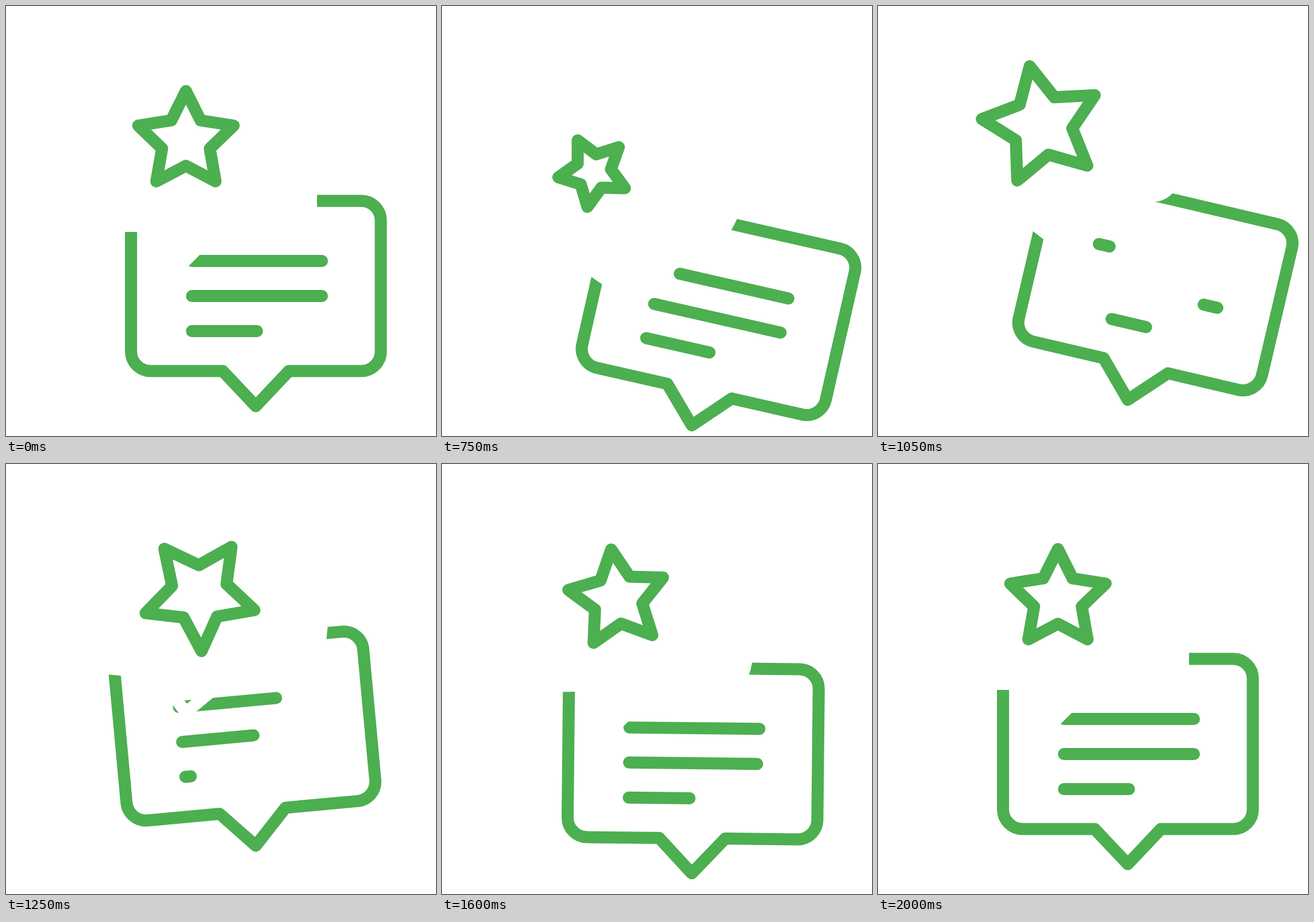
Animation of 748 by 748 pixels, one loop 2.02 s. Source, as an HTML page without scripts:

```html
<!DOCTYPE html>
<html lang="en">
<head>
<meta charset="utf-8">
<title>Review bubble</title>
<style>
html, body { margin: 0; width: 100%; height: 100%; overflow: hidden; background: #fff; }
svg { display: block; width: 100vw; height: 100vh; fill: none; stroke: #4caf50; stroke-width: 21; stroke-linejoin: round; stroke-linecap: round; }

.bubble, .gap, .notch, .sway, .star, .rows line {
  animation-duration: 2.02s;
  animation-iteration-count: infinite;
  animation-timing-function: cubic-bezier(.37, 0, .63, 1);
}

/* speech bubble: bounce and tilt around its tip */
.bubble { transform-origin: 434px 696px; animation-name: bounce, tilt; }
@keyframes bounce {
  0%, 24.75% { translate: 0 0; }
  37.62% { translate: 0 33.5px; animation-timing-function: cubic-bezier(.42, 0, .55, 1); }
  61.88% { translate: 0 -32px; }
  79.21% { translate: 0 16px; }
  99.01%, 100% { translate: 0 0; }
}
@keyframes tilt {
  0% { rotate: 0deg; }
  24.75% { rotate: 0deg; animation-timing-function: cubic-bezier(.2, 0, .2, 1); }
  47.52% { rotate: 15deg; animation-timing-function: cubic-bezier(.57, 0, .5, 1); }
  65.84% { rotate: -7deg; }
  86.14% { rotate: 3.2deg; }
  99.01%, 100% { rotate: 0deg; }
}

/* opening in the outline, next to the star */
.gap { fill: #fff; stroke: none; animation-name: gap; }
@keyframes gap {
  0%, 24.75%, 99.01%, 100% { d: path("M200 393L235 393L260 365L541 356Q541 338 541 320L200 320Z"); }
  37.13% { d: path("M200 480L235 494L260 365L423.5 356Q430 342 433 320L200 320Z"); }
  51.98% { d: path("M200 445L235 461L260 365L396 351Q422 346 432 320L200 320Z"); }
  61.88% { d: path("M200 375L235 381L260 365L589 356Q592 338 595.5 320L200 320Z"); }
  79.21% { d: path("M200 383L235 382L260 365L527 356Q535 344 536 320L200 320Z"); }
}

/* text rows: wiped from the left, then written again */
.rows line { animation-name: rewrite; animation-timing-function: linear; stroke-dasharray: 1 2; }
.rows line:nth-child(2) { animation-delay: .1s; }
.rows line:nth-child(3) { animation-delay: .2s; }
@keyframes rewrite {
  0%, 32.18% { stroke-dasharray: 1 2; stroke-dashoffset: 0; }
  37.13% { stroke-dashoffset: -.14; }
  42.08% { stroke-dashoffset: -.45; }
  47.03% { stroke-dashoffset: -.89; }
  49.5% { stroke-dasharray: 1 2; stroke-dashoffset: -1; }
  49.51% { stroke-dasharray: 0 2; stroke-dashoffset: 0; }
  51.98% { stroke-dasharray: .08 2; }
  56.93% { stroke-dasharray: .55 2; }
  61.88% { stroke-dasharray: .75 2; }
  69.31% { stroke-dasharray: .935 2; }
  74.26% { stroke-dasharray: .985 2; }
  79.21%, 100% { stroke-dasharray: 1 2; stroke-dashoffset: 0; }
}

/* white corner that clips the first row */
.notch { stroke: #fff; stroke-linejoin: miter; stroke-linecap: butt; animation-name: notch; }
@keyframes notch {
  0%, 24.75%, 99.01%, 100% { d: path("M270 416L300 455L345 410"); }
  37.13% { d: path("M300 351L330 390L375 345"); }
  51.98% { d: path("M300 331L330 370L375 330"); }
  61.88% { d: path("M283 393L313 432L371 384"); }
  79.21% { d: path("M265 423L295 462L340 417"); }
}

/* star: sideways swing, hop, turn and size */
.sway { animation-name: sway; }
.star { animation-name: hop, turn, size; vector-effect: non-scaling-stroke; }
@keyframes sway {
  0% { translate: 0 0; }
  24.75% { translate: 0 0; animation-timing-function: cubic-bezier(.2, 0, .3, 1); }
  44.55% { translate: -56px 0; animation-timing-function: cubic-bezier(.33, 0, .6, 1); }
  64.36% { translate: 26px 0; }
  81.68% { translate: -9px 0; }
  99.01%, 100% { translate: 0 0; }
}
@keyframes hop {
  0%, 24.75% { translate: 0 0; }
  37.62% { translate: 0 54px; }
  53.96% { translate: 0 -30px; animation-timing-function: cubic-bezier(.3, 0, .4, 1); }
  69.31%, 100% { translate: 0 0; }
}
@keyframes turn {
  0% { rotate: 0deg; }
  24.75% { rotate: 0deg; animation-timing-function: cubic-bezier(.2, 0, .3, 1); }
  44.55% { rotate: -30deg; animation-timing-function: cubic-bezier(.47, 0, .55, 1); }
  64.36% { rotate: 36deg; }
  81.68% { rotate: -9.6deg; }
  99.01%, 100% { rotate: 0deg; }
}
@keyframes size {
  0% { scale: 1; }
  24.75% { scale: 1; animation-timing-function: cubic-bezier(.33, .2, .6, 1); }
  38.12% { scale: .705; }
  53.47% { scale: 1.22; }
  74.26%, 100% { scale: 1; }
}
</style>
</head>
<body>
<svg viewBox="0 0 748 748">
  <g class="bubble">
    <path d="M217.5 601V373a34 34 0 0 1 34-34H618a34 34 0 0 1 34 34V601a34 34 0 0 1-34 34H492L434.5 696L377 635H251.5a34 34 0 0 1-34-34Z"/>
    <path class="gap" d="M200 393L235 393L260 365L541 356Q541 338 541 320L200 320Z"/>
    <g class="rows">
      <line x1="323.5" y1="443.5" x2="549.5" y2="443.5" pathLength="1"/>
      <line x1="323.5" y1="504.5" x2="549.5" y2="504.5" pathLength="1"/>
      <line x1="323.5" y1="565.5" x2="436.5" y2="565.5" pathLength="1"/>
    </g>
  </g>
  <path class="notch" d="M270 416L300 455L345 410"/>
  <g transform="translate(313 235)">
    <g class="sway">
      <path class="star" d="M0-87L25.5-36L83-27L41.5 13L51.5 70L0 43L-51.5 70L-41.5 13L-83-27L-25.5-36Z"/>
    </g>
  </g>
</svg>
</body>
</html>
```
